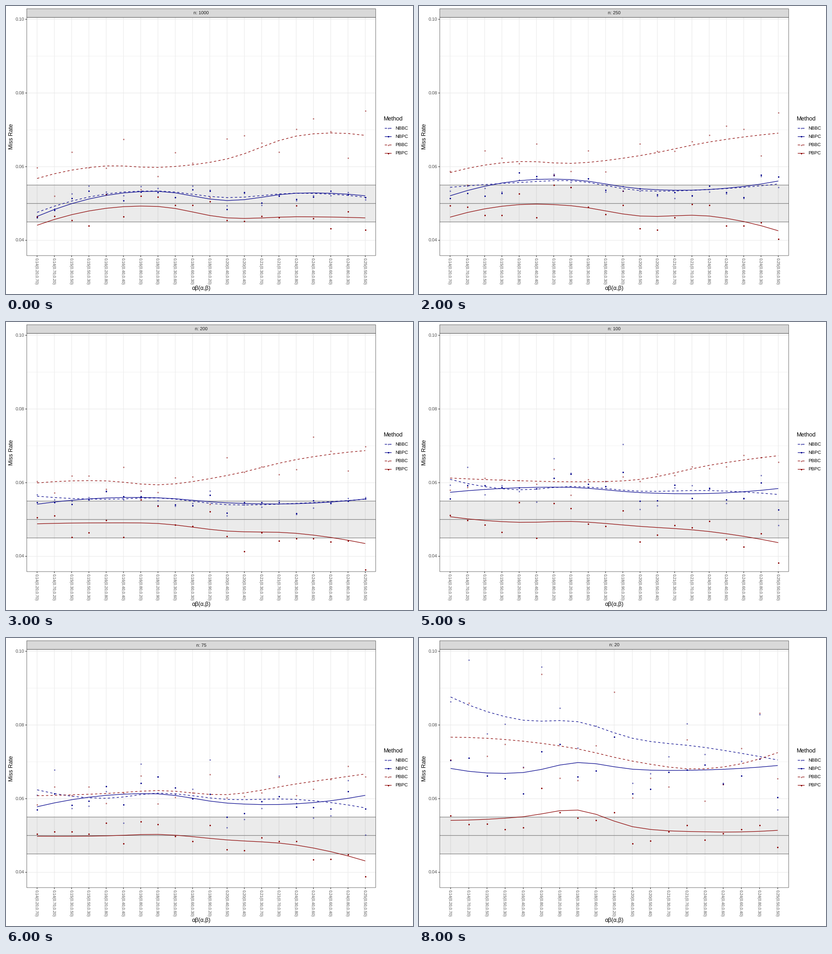
A matplotlib script for the animation above (9000 ms loop, 890 by 629 pixels).

```python
import numpy as np
import matplotlib.pyplot as plt
from matplotlib.animation import FuncAnimation
from matplotlib.patches import Rectangle

W, H, DPI = 890, 629, 100
PT = 72 / DPI  # points per pixel
LEFT, RIGHT, STRIP, TOP, BOTTOM = 45.3, 808.3, 6.0, 24.9, 545.1
NAVY, RED, EDGE, GRID = "#00008B", "#8B0000", "#333333", "#EBEBEB"
METHODS = [("NBBC", NAVY, True), ("NBPC", NAVY, False),
           ("PBBC", RED, True), ("PBPC", RED, False)]
SIZES = [1000, 500, 250, 200, 150, 100, 75, 50, 20]

# All effect pairs, in tenths, whose product lies between 0.14 and 0.25
PAIRS = sorted(((a, b) for a in range(2, 10) for b in range(2, 10)
                if 14 <= a * b <= 25), key=lambda p: (p[0] * p[1], p[0]))

# Trend heights in 1e-4 at the knots, one row per method
KNOTS = np.array([0, 4, 7, 11, 15, 19])
TRENDS = {
    20: [[876, 813, 809, 764, 739, 705], [682, 671, 698, 680, 678, 690],
         [767, 756, 735, 702, 681, 725], [541, 551, 569, 524, 510, 514]],
    50: [[668, 645, 667, 629, 634, 629], [616, 643, 651, 625, 622, 629],
         [607, 585, 610, 623, 646, 683], [486, 532, 539, 485, 475, 486]],
    75: [[624, 601, 615, 598, 598, 575], [578, 609, 613, 588, 586, 609],
         [608, 614, 622, 611, 640, 667], [498, 499, 503, 488, 474, 431]],
    150: [[588, 552, 554, 547, 551, 558], [568, 554, 551, 552, 549, 549],
          [619, 593, 575, 606, 657, 682], [521, 483, 483, 472, 458, 446]],
    250: [[544, 557, 562, 535, 538, 553], [521, 562, 565, 540, 538, 561],
          [584, 614, 609, 630, 667, 691], [463, 497, 494, 466, 466, 426]],
    1000: [[476, 526, 534, 516, 528, 517], [465, 522, 533, 508, 528, 521],
           [568, 602, 598, 621, 683, 685], [441, 487, 492, 461, 464, 461]],
}

plt.rcParams.update({"font.family": "Liberation Sans", "text.hinting": "none"})


def y_of(rate):
    return 29.1 + (0.1 - rate) * 8045


def knot_heights(n):
    """Knot heights for sample size n, interpolated over log n."""
    sizes = np.log(list(TRENDS))
    heights = np.array(list(TRENDS.values()), float).reshape(len(sizes), -1)
    row = [np.interp(np.log(n), sizes, h) for h in heights.T]
    return np.reshape(row, (len(METHODS), -1))


def smooth(knots, vals, x):
    """Cubic Hermite curve through the knots."""
    slope = np.gradient(vals, knots, edge_order=2)
    i = np.clip(np.searchsorted(knots, x, "right") - 1, 0, len(knots) - 2)
    h = knots[i + 1] - knots[i]
    t = (x - knots[i]) / h
    u = 1 - t
    return (u * u * ((1 + 2 * t) * vals[i] + t * h * slope[i])
            + t * t * ((3 - 2 * t) * vals[i + 1] - u * h * slope[i + 1]))


def simulate(n):
    """Pairs, trend rates and observed rates (out of 5000) for size n."""
    pairs = [p for p in PAIRS if n > 20 or p != (2, 8)]
    count = len(pairs)
    knots = KNOTS - (KNOTS > 7) * (len(PAIRS) - count)
    pos = np.arange(count)
    trend = np.array([smooth(knots, v, pos) for v in knot_heights(n)]) / 1e4

    # Uneven pairs miss more or less often, mostly in small samples
    a, b = np.array(pairs).T / 10
    fade = np.exp(-n / 80)
    gain = np.array([250 * fade, 125 * fade, 230 * fade - 80, 50])
    lean = np.array([80 * fade, 0, 150 * fade - 30, 0])
    shift = np.outer(gain, np.abs(a - b) - 0.35) + np.outer(lean, a - b)

    rng = np.random.default_rng(n)
    shared = rng.normal(0, 7, (2, count)).repeat([2, 2], axis=0)
    noise = shared + rng.normal(0, 3, shared.shape)
    return pairs, trend, np.round(trend * 5000 + shift + noise) / 5000


RUNS = [simulate(n) for n in SIZES]

fig = plt.figure(figsize=(W / DPI, H / DPI), dpi=DPI, facecolor="white")
ax = fig.add_axes([0, 0, 1, 1])


def line(x, y, color, width=1.2, **kw):
    ax.plot(x, y, color=color, lw=width * PT, solid_capstyle="butt",
            dash_capstyle="butt", snap=False, **kw)


def text(x, y, s, size, color="black", ha="left", angle=0):
    ax.text(x, y, s, fontsize=size * PT, color=color, ha=ha, va="baseline",
            rotation=angle, rotation_mode="anchor", zorder=6)


def box(y0, y1, **kw):
    ax.add_patch(Rectangle((LEFT, y0), RIGHT - LEFT, y1 - y0, snap=False, **kw))


def trend_line(x, y, color, dashed):
    line(x, y, color, 1.22, ls=(0, (4, 4)) if dashed else "-", zorder=4)


def dots(x, y, color, faded):
    ax.plot(x, y, "o", color=color, ms=3.2 * PT, mew=0,
            alpha=0.5 if faded else 1, zorder=3)


def draw_panel(xs, pairs):
    for rate in (0.05, 0.07, 0.09):
        line([LEFT, RIGHT], [y_of(rate)] * 2, GRID, 0.6, zorder=1)
    for rate in (0.04, 0.06, 0.08, 0.10):
        y = y_of(rate)
        line([LEFT, RIGHT], [y, y], GRID, zorder=1)
        line([LEFT - 3.1, LEFT], [y, y], EDGE)
        text(40.2, y + 3.6, f"{rate:.2f}", 10, "#4D4D4D", "right")
    for x, (a, b) in zip(xs, pairs):
        line([x, x], [TOP, BOTTOM], GRID, zorder=1)
        line([x, x], [BOTTOM, BOTTOM + 3.1], EDGE)
        label = f"{a * b / 100:.2f}({a / 10:.2f},{b / 10:.2f})"
        text(x - 4.4, 550.2, label, 8.6, "#4D4D4D", angle=270)
    box(y_of(0.055), y_of(0.045), fc="black", alpha=0.08, lw=0, zorder=2)
    for rate in (0.045, 0.05, 0.055):
        line([LEFT, RIGHT], [y_of(rate)] * 2, "#7F7F7F", zorder=2.5)
    box(TOP, BOTTOM, fc="none", ec=EDGE, lw=0.7 * PT, zorder=5)
    text(15.3, 285, "Miss Rate", 12.6, ha="center", angle=90)
    text(427, 620.5, "αβ(α,β)", 12.6, ha="center")


def draw_strip(n):
    box(STRIP, TOP, fc="#D9D9D9", ec=EDGE, lw=0.7 * PT, zorder=5)
    text(427, 19, f"n: {n}", 10, "#1A1A1A", "center")


def draw_legend():
    text(826, 250, "Method", 12.6)
    for k, (name, color, bc) in enumerate(METHODS):
        y = 267.1 + 18.2 * k
        trend_line([828.3, 843.2], [y, y], color, bc)
        dots([835.8], [y], color, bc)
        text(850.8, y + 3.7, name, 10.1)


def draw(frame):
    pairs, trend, rates = RUNS[frame]
    count = len(pairs)
    xs = LEFT + (RIGHT - LEFT) / (count + 0.2) * (0.6 + np.arange(count))

    ax.clear()
    ax.set(xlim=(0, W), ylim=(H, 0))
    ax.axis("off")
    draw_panel(xs, pairs)
    draw_strip(SIZES[frame])
    for (_, color, bc), fit, seen in zip(METHODS, trend, rates):
        dots(xs, y_of(seen), color, bc)
        trend_line(xs, y_of(fit), color, bc)
    draw_legend()
    return []


anim = FuncAnimation(fig, draw, frames=len(RUNS), interval=1000,
                     init_func=lambda: [], repeat=True, repeat_delay=0)
plt.show()
```
